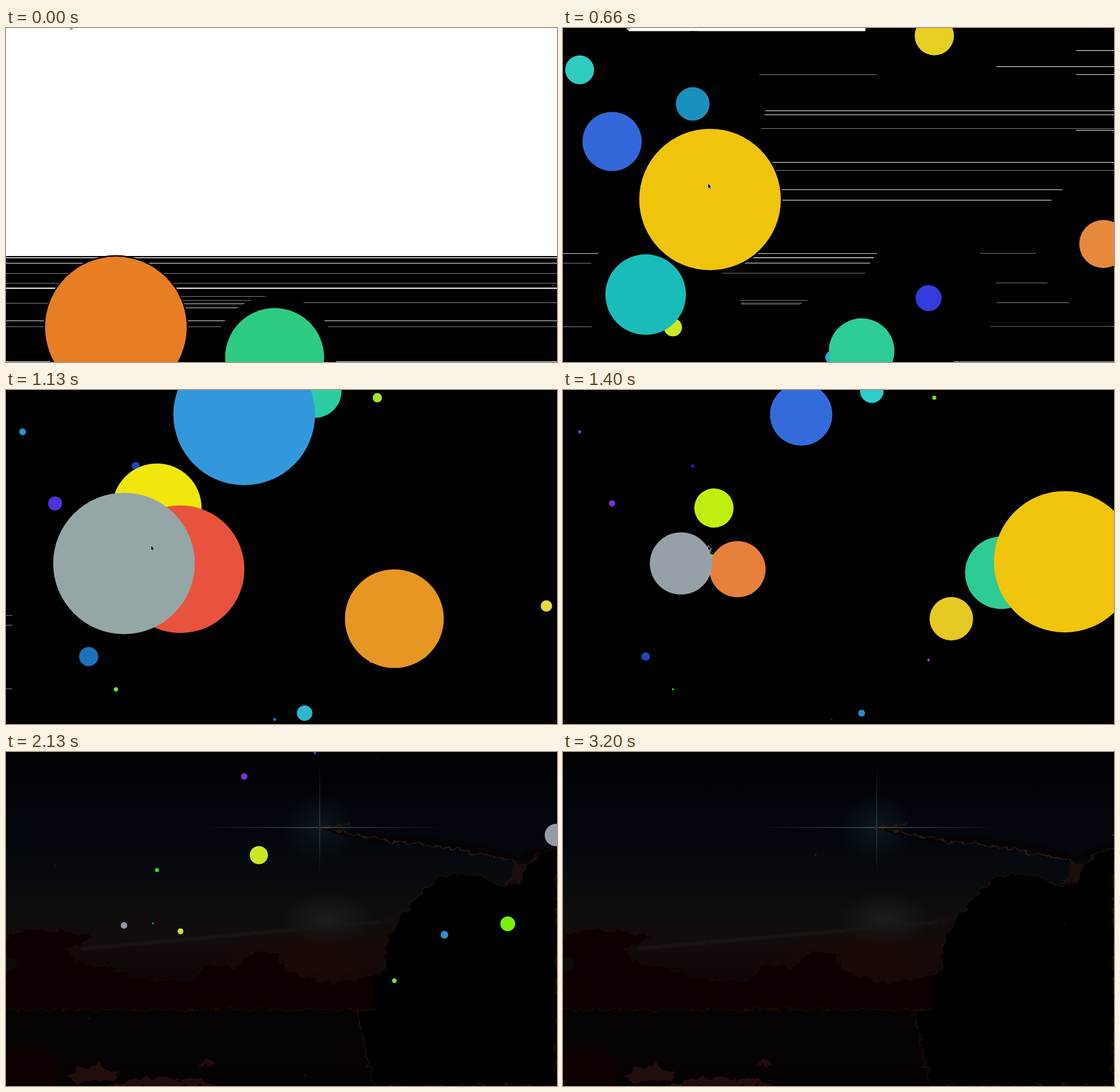
Write an HTML page without scripts that moves like this. It is 960 by 583 pixels and loops after 3270 ms.

```html
<!DOCTYPE html>
<html lang="en">
<head>
<meta charset="utf-8">
<title>Shrinking dots</title>
<style>
@property --k { syntax: "<integer>"; inherits: true; initial-value: 0; }
html, body { margin: 0; width: 100%; height: 100%; overflow: hidden; background: #000; }
svg { display: block; width: 100vw; height: 100vh; animation: tick 3270ms steps(49, jump-none) -7ms infinite; }
@keyframes tick { from { --k: 0; } to { --k: 48; } }

/* shown from tick --a until tick --z */
.span { opacity: clamp(0, min(var(--k) - var(--a) + 1, var(--z) - var(--k)), 1); }

/* each dot ages four steps per tick: 5% smaller and one degree of hue per step */
.dots circle, .wipe circle { --n: calc(4 * var(--k) - var(--b)); opacity: clamp(0, 2 * var(--n) + 1, 1); }
.dots circle {
  --age: max(var(--n), 0);
  r: calc(123.4px * pow(.95, var(--age)));
  fill: hsl(calc(var(--h) + var(--age)) var(--s) var(--l));
}
.orange { --h: 28; --s: 80%; --l: 52%; }
.green { --h: 145; --s: 63%; --l: 49%; }
.teal { --h: 168; --s: 76%; --l: 42%; }
.blue { --h: 204; --s: 70%; --l: 53%; }
.red { --h: 6; --s: 78%; --l: 57%; }
.yellow { --h: 48; --s: 89%; --l: 50%; }
.gray { --h: 184; --s: 9%; --l: 62%; }

.w, .g { fill: none; stroke: #fff; stroke-width: 1; }
.g { stroke: #858585; }
.bar { fill: #fff; }
</style>
</head>
<body>
<svg viewBox="0 0 960 583">
  <defs>
    <linearGradient id="sky" x2="0" y2="1">
      <stop offset="0" stop-color="#020204"/>
      <stop offset=".12" stop-color="#02040a"/>
      <stop offset=".27" stop-color="#03070d"/>
      <stop offset=".38" stop-color="#080a0d"/>
      <stop offset=".47" stop-color="#0f0d0e"/>
      <stop offset=".57" stop-color="#130c0a"/>
      <stop offset=".67" stop-color="#0e0606"/>
      <stop offset=".76" stop-color="#050304"/>
      <stop offset=".92" stop-color="#070304"/>
      <stop offset="1" stop-color="#050203"/>
    </linearGradient>
    <radialGradient id="glow">
      <stop offset="0" stop-color="#1b1d1f"/>
      <stop offset="1" stop-color="#1b1d1f" stop-opacity="0"/>
    </radialGradient>
    <radialGradient id="halo">
      <stop offset="0" stop-color="#0b171d"/>
      <stop offset="1" stop-color="#0b171d" stop-opacity="0"/>
    </radialGradient>
    <radialGradient id="ember">
      <stop offset="0" stop-color="#1d0a07"/>
      <stop offset="1" stop-color="#1d0a07" stop-opacity="0"/>
    </radialGradient>
    <linearGradient id="ray">
      <stop offset="0" stop-color="#55595a" stop-opacity="0"/>
      <stop offset=".48" stop-color="#55595a"/>
      <stop offset="1" stop-color="#55595a" stop-opacity="0"/>
    </linearGradient>
    <linearGradient id="beam" x2="0" y2="1">
      <stop offset="0" stop-color="#3a4448" stop-opacity="0"/>
      <stop offset=".55" stop-color="#3a4448"/>
      <stop offset="1" stop-color="#3a4448" stop-opacity="0"/>
    </linearGradient>
    <filter id="rough" x="-5%" y="-5%" width="110%" height="110%">
      <feTurbulence type="fractalNoise" baseFrequency=".06" numOctaves="3" seed="4"/>
      <feDisplacementMap in="SourceGraphic" scale="18" xChannelSelector="R" yChannelSelector="G"/>
    </filter>
  </defs>

  <rect width="960" height="583"/>

  <!-- dusk sky -->
  <g class="span" style="--a:29;--z:49">
    <rect width="960" height="583" fill="url(#sky)"/>
    <ellipse cx="546" cy="132" rx="65" ry="60" fill="url(#halo)"/>
    <ellipse cx="560" cy="292" rx="80" ry="48" fill="url(#glow)"/>
    <ellipse cx="540" cy="370" rx="200" ry="70" fill="url(#ember)"/>
    <path d="M130 340L660 293L660 299L130 347Z" fill="#1b1716" opacity=".7"/>
    <path d="M552 130Q640 146 740 150T890 182L925 165L960 160V185L880 190Q800 165 700 160T552 134Z" fill="#040405"/>
    <g filter="url(#rough)">
      <path d="M960 165L925 178L905 200L895 226L868 236L830 218L795 210L750 222L720 250L690 285L665 330L655 385L600 400L640 583H960Z" fill="#030305" stroke="#1c0b08" stroke-width="2"/>
      <path d="M0 322L40 308L90 312L155 322L140 332L105 345L130 366L190 380L245 396L320 400L345 372L400 376L440 346L475 354L495 385L560 404L640 390V450H0Z" fill="#070304" stroke="#180907" stroke-width="1.5"/>
      <path d="M650 292L672 286L682 296L660 304ZM225 330L245 324L262 332Z" fill="#170a08"/>
      <path d="M552 133L600 126M555 134L600 141L650 153L720 161L790 170L850 183L880 190L892 205L872 232" fill="none" stroke="#2b1811" stroke-width="2.5"/>
      <path d="M885 192L908 196L898 222L876 232Z" fill="#1e0c08"/>
      <path d="M105 565L130 550L165 548L200 562L180 575L120 576ZM175 583L215 572L265 568L330 570L372 583ZM335 545L348 535L360 540L358 550Z" fill="#200a08"/>
      <path d="M0 520L40 514L85 530L105 560L70 583H0Z" fill="#0b0505"/>
    </g>
    <path d="M0 358L16 362L20 375L0 388Z" fill="#0e0a0a"/>
    <rect x="345" y="131" width="415" height="1.4" fill="url(#ray)"/>
    <rect x="545.8" y="22" width="1.4" height="195" fill="url(#beam)"/>
    <circle cx="546.5" cy="132" r="3.5" fill="#3a211b"/>
  </g>

  <!-- white flash -->
  <g class="span" style="--a:0;--z:1">
    <rect class="bar" width="960" height="398"/>
    <path d="M111 0H117L116 3H111Z" fill="#aaa"/>
    <path d="M0 401H960" class="w" style="stroke:#bbb;stroke-width:2"/>
    <path d="M0 454.3H960" class="w" style="stroke-width:2"/>
    <path class="w" d="M0 410.5H960M0 511H960M0 582.5H77M575 582.5H960M447 468.5H452"/>
    <path class="g" d="M0 428.5H960M0 445.5H960M303 468.5H459M306 475.5H429M0 480.5H75M308 480.5H417M310 482H415M518 479.5H960M311 487.5H407M312 489.2H404M0 521.5H960"/>
  </g>

  <!-- streaks left behind -->
  <g class="span" style="--a:1;--z:8">
    <path class="bar" d="M0 270H887L870 282.5H0ZM0 361H67V366H0Z"/>
    <path class="w" d="M0 300.5H130M55 455.5H67M84 400.3H166M0 234.8H153"/>
    <path class="g" d="M0 248.8H179M0 358.5H68M0 401.5H84M0 428.5H68"/>
  </g>
  <g class="span" style="--a:1;--z:12">
    <path class="bar" d="M111 0H529L530 5.5H115Z"/>
    <path d="M111 0H117L116 3H111Z" fill="#aaa"/>
    <path class="w" d="M894 39.5H960M755 67.5H960M894 81.2H960M351 144.5H960M350 151.5H960M894 178.5H960M304 234.5H960M130 282.2H871M130 300.5H852M218 400.5H542M250 410.3H535M680 582.8H960"/>
    <path d="M0 393.7H547M218 401H542" class="w" style="stroke:#b4b9b4;stroke-width:1.3"/>
    <path class="g" d="M340 81.5H547M343 175.5H960M283 248.5H960M725 393.3H825M0 410.5H134M277 428H528M754 445H844M306 475.5H429M308 480.2H417M310 482H415M754 479.5H883M0 521.5H68M745 521H960"/>
  </g>
  <path class="g span" style="--a:12;--z:21" d="M0 393.7H11M0 410.5H11M0 521.5H11"/>

  <!-- each new dot wipes the streaks around it -->
  <g class="span" style="--a:0;--z:12">
    <g class="wipe">
      <circle cx="468" cy="575" r="107.7" style="--b:-7"/>
      <circle cx="191.5" cy="522.5" r="126" style="--b:0"/>
      <circle cx="637" cy="471.5" r="119" style="--b:7"/>
      <circle cx="29" cy="73" r="108" style="--b:9"/>
      <circle cx="226" cy="132.5" r="127" style="--b:12"/>
      <circle cx="647" cy="13.5" r="120.5" style="--b:15"/>
      <circle cx="941.5" cy="377" r="118.5" style="--b:19"/>
      <circle cx="85.5" cy="198" r="120" style="--b:23"/>
      <circle cx="144" cy="465.5" r="109.5" style="--b:29"/>
      <circle cx="256" cy="299.5" r="126.5" style="--b:40"/>
    </g>
  </g>

  <g class="dots">
    <circle class="green" cx="468" cy="575" style="--b:-7"/>
    <circle class="orange" cx="191.5" cy="522.5" style="--b:0"/>
    <circle class="blue" cx="637" cy="471.5" style="--b:7"/>
    <circle class="green" cx="29" cy="73" style="--b:9"/>
    <circle class="teal" cx="226" cy="132.5" style="--b:12"/>
    <circle class="orange" cx="647" cy="13.5" style="--b:15"/>
    <circle class="red" cx="941.5" cy="377" style="--b:19"/>
    <circle class="blue" cx="85.5" cy="198" style="--b:23"/>
    <circle class="green" cx="520.3" cy="564" style="--b:25"/>
    <circle class="teal" cx="144" cy="465.3" style="--b:29"/>
    <circle class="yellow" cx="256.2" cy="299.3" style="--b:40"/>
    <circle class="green" cx="538" cy="2" style="--b:49"/>
    <circle class="yellow" cx="263" cy="206" style="--b:59"/>
    <circle class="orange" cx="676.6" cy="399.2" style="--b:61"/>
    <circle class="red" cx="304" cy="312.8" style="--b:66"/>
    <circle class="blue" cx="415" cy="42.8" style="--b:68"/>
    <circle class="gray" cx="205.6" cy="302.8" style="--b:68"/>
    <circle class="green" cx="763.8" cy="319" style="--b:71"/>
    <circle class="yellow" cx="874.2" cy="299.8" style="--b:84"/>
    <circle class="orange" cx="440.5" cy="180" style="--b:88"/>
    <circle class="gray" cx="958" cy="145" style="--b:92"/>
  </g>

  <path class="span" style="--a:10;--z:29" d="M252.5 270.8V280.5L254.7 278.6L256.3 282L257.7 281.3L256.2 278H259Z" stroke="#ddd" stroke-width=".8"/>
</svg>
</body>
</html>
```
